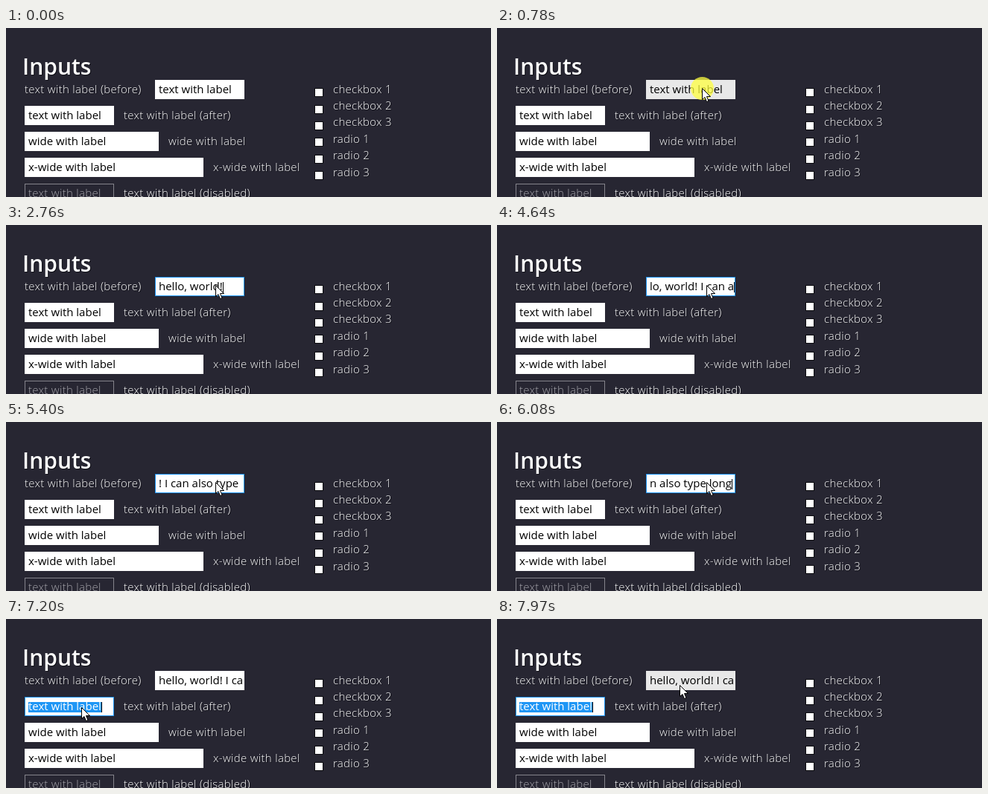
An HTML page with a canvas that plays this animation: 651x228 px, repeating every 8000 ms.

```html
<!DOCTYPE html>
<html lang="en">
<head>
<meta charset="utf-8">
<title>Inputs</title>
<style>
  html, body { margin: 0; width: 651px; height: 228px; overflow: hidden; background: #272632; }
  canvas { display: block; }
</style>
</head>
<body>
<canvas id="stage" width="651" height="228"></canvas>
<script>
const g = document.getElementById('stage').getContext('2d');
const LOOP = 8000, FACE = '"Open Sans", "Noto Sans", sans-serif';
const BODY = `400 15px ${FACE}`, LIGHT = `300 15px ${FACE}`, HEAD = `600 30px ${FACE}`;
const BACK = '#272632', BLUE = '#1e96f5', HOVER = '#e8e8e8', ROOM = 113.5;

const within = (t, spans) => spans.some(([a, b]) => t >= a && t < b);

// Each typed run: start, end, characters spread evenly between them.
const typed = [
  [1690, 2430, 'hello, wor'], [2520, 2600, 'ld'], [2760, 2760, '!'],
  [4130, 4640, ' I can a'], [4740, 4860, 'lso'], [4960, 5090, ' ty'],
  [5240, 5400, 'pe'], [5430, 5770, ' long']
];
const caretOn = [[840, 1480], [2350, 3230], [4130, 4890], [6080, 7060]];

// Pointer keys: time, x, y.
const path = [
  [180, 565, 214], [420, 420, 146], [600, 300, 92], [720, 275, 81],
  [1200, 275, 81], [1250, 281, 81], [6330, 281, 81], [6590, 107, 111],
  [6690, 101, 119], [7600, 101, 119], [7720, 135, 107], [7890, 135, 107], [7970, 245, 89]
];

function pointer(t) {
  const i = path.findIndex(k => k[0] > t);
  if (i === 0) return null;
  if (i < 0) return path[path.length - 1].slice(1);
  const [t0, x0, y0] = path[i - 1], [t1, x1, y1] = path[i];
  const p = (t - t0) / (t1 - t0);
  return [Math.round(x0 + (x1 - x0) * p), Math.round(y0 + (y1 - y0) * p)];
}

function typedText(t) {
  let s = '';
  for (const [from, to, chars] of typed) {
    if (t < from) break;
    const step = (to - from) / Math.max(1, chars.length - 1);
    s += step ? chars.slice(0, Math.floor((t - from) / step + 1.001)) : chars;
  }
  return s;
}

function setFont(font) {
  g.font = font;
  g.letterSpacing = font === LIGHT ? '0.3px' : '0px';
}

function text(s, x, y, color, font = BODY) {
  setFont(font);
  g.fillStyle = color;
  g.fillText(s, x, y);
}

function label(s, x, y, font = LIGHT) {
  text(s, x + 1, y + 1, '#111118', font);
  text(s, x, y, '#fff', font);
}

function rect(x, y, w, h, color) {
  g.fillStyle = color;
  g.fillRect(x, y, w, h);
}

function field(x, y, w, s, { fill = '#fff', edge = fill, ink = '#000', font = BODY, focus, caret, selected } = {}) {
  setFont(font);
  while (g.measureText(s).width > w - 120 + ROOM) s = focus ? s.slice(1) : s.slice(0, -1);
  const end = Math.round(x + 5 + g.measureText(s).width);
  rect(x, y, w, 26, focus ? BLUE : edge);
  rect(x + 1, y + 1, w - 2, 24, fill);
  if (selected) rect(x + 5, y + 7, end - x - 5, 14, BLUE);
  text(s, x + 5, y + 18, selected ? '#fff' : ink, font);
  if (caret) rect(end, y + 7, 1, 14, '#000');
}

function arrow(x, y) {
  g.save();
  g.translate(x + 0.5, y + 0.5);
  g.beginPath();
  [[0, 0], [0, 15], [3.5, 12], [6, 18], [8.5, 17], [6, 11], [11, 11]].forEach(p => g.lineTo(...p));
  g.closePath();
  g.fillStyle = '#fff';
  g.fill();
  g.strokeStyle = '#000';
  g.lineWidth = 1;
  g.stroke();
  g.restore();
}

function halo(x, y) {
  g.fillStyle = 'rgba(255, 255, 64, 0.75)';
  g.beginPath();
  g.arc(x + 0.5, y + 0.5, 15.5, 0, Math.PI * 2);
  g.fill();
}

function draw(t) {
  rect(0, 0, 651, 228, BACK);
  label('Inputs', 22, 63, HEAD);
  label('text with label (before)', 25, 88);
  label('text with label (after)', 158, 123);
  label('wide with label', 218, 158);
  label('x-wide with label', 278, 193);
  label('text with label (disabled)', 158, 228);

  ['checkbox 1', 'checkbox 2', 'checkbox 3', 'radio 1', 'radio 2', 'radio 3'].forEach((s, i) => {
    const y = Math.round(82.2 + i * 22.35);
    rect(414, y - 1, 12, 12, '#0c0c10');
    rect(415, y, 10, 10, '#fff');
    label(s, 439, Math.round(87.6 + i * 22.4));
  });

  const first = within(t, [[840, 7060]]), second = t >= 7060;
  field(200, 70, 120, t < 1690 ? 'text with label' : typedText(t), {
    fill: within(t, [[680, 840], [7690, LOOP]]) ? HOVER : '#fff',
    focus: first, caret: within(t, caretOn), selected: first && t < 1690
  });
  field(25, 105, 120, 'text with label', {
    fill: within(t, [[6660, 7060]]) ? HOVER : '#fff',
    focus: second, caret: second, selected: second
  });
  field(25, 140, 180, 'wide with label');
  field(25, 175, 240, 'x-wide with label');
  field(25, 210, 120, 'text with label', { fill: BACK, edge: '#85848c', ink: '#a4a3aa', font: LIGHT });

  const at = pointer(t);
  if (!at) return;
  if (within(t, [[780, 910], [7520, 7600]])) halo(...at);
  arrow(...at);
}

const start = performance.now();
function frame() {
  draw((performance.now() - start) % LOOP);
  requestAnimationFrame(frame);
}
frame();
</script>
</body>
</html>
```
